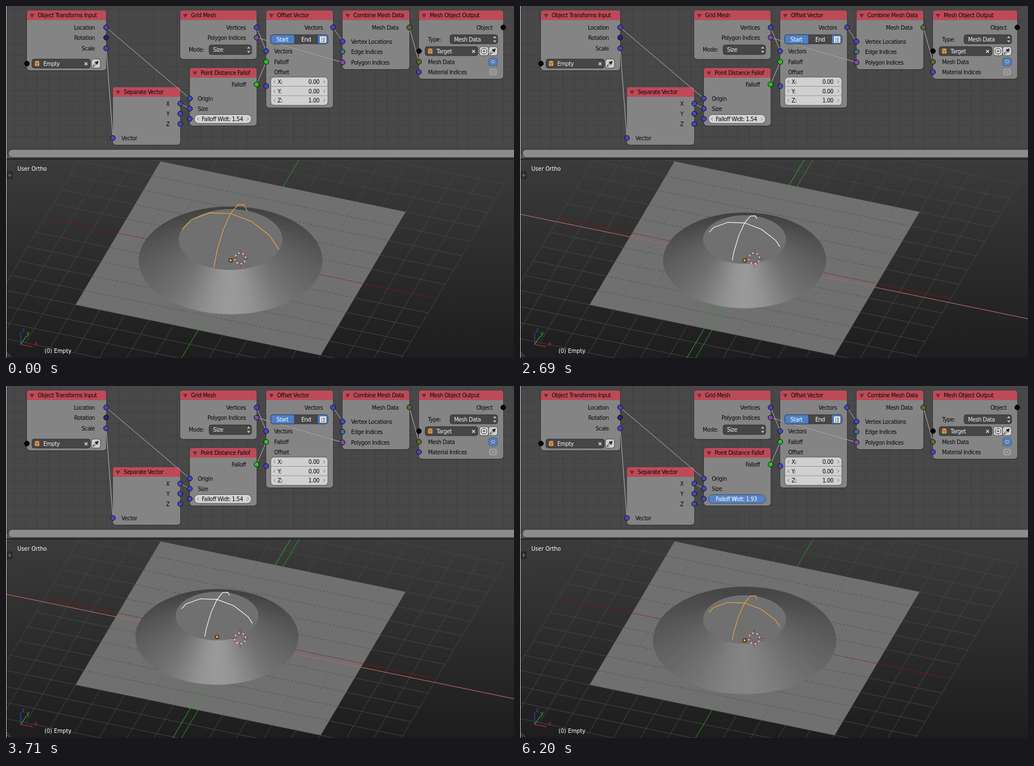
Write an HTML page with a canvas that moves like this. It is 898 by 624 pixels and loops after 6.25 s.

```html
<!DOCTYPE html>
<html lang="en">
<head>
<meta charset="utf-8">
<title>Falloff nodes</title>
<style>
html, body { margin: 0; width: 100%; height: 100%; overflow: hidden; background: #1e1e1e; }
canvas, svg { position: absolute; left: 0; top: 0; display: block; }
text { font: 9.6px "DejaVu Sans", sans-serif; letter-spacing: -.45px; white-space: pre; }
.view { letter-spacing: 0; }
</style>
</head>
<body>
<canvas id="view" width="898" height="624"></canvas>
<svg id="ui" width="898" height="624" viewBox="0 0 898 624"></svg>
<script>
// ---------- node editor ----------
const BLUE = '#4646c0', NAVY = '#29256e', GREEN = '#25c425', PURPLE = '#8448a8',
      OLIVE = '#5d6b2b', TEAL = '#41708c', BLACK = '#050505', ACTIVE = '#4f80c4';

const rect = (x, y, x2, y2, fill, rx = 0, more = '') =>
  `<rect x="${x}" y="${y}" width="${x2 - x}" height="${y2 - y}" rx="${rx}" fill="${fill}" ${more}/>`;
const label = (x, y, s, fill = '#080808', anchor = 'start', more = '') =>
  `<text x="${x}" y="${y}" fill="${fill}" text-anchor="${anchor}" ${more}>${s}</text>`;
const right = (x, y, s) => label(x, y, s, '#080808', 'end');
const path = (d, stroke, w = 1, fill = 'none', more = '') =>
  `<path d="${d}" stroke="${stroke}" stroke-width="${w}" fill="${fill}" ${more}/>`;
const socket = (x, y, c) =>
  `<circle cx="${x}" cy="${y}" r="4.4" fill="${c}" stroke="#0c0c0c" stroke-width="1"/>`;

const node = (x, y, x2, y2, title) =>
  rect(x - 1, y, x2 + 1, y2 + 1.5, '#000', 6, 'opacity=".2"') +
  rect(x, y, x2, y2, '#848484', 5) +
  path(`M${x} ${y + 17}V${y + 5}q0-5 5-5H${x2 - 5}q5 0 5 5V${y + 17}Z`, 'none', 0, '#bd4a58') +
  path(`M${x + 5} ${y + 6}h8l-4 7z`, 'none', 0, '#6c2b34') +
  label(x + 19, y + 12.2, title);

const dark = (x, y, x2, y2) => rect(x, y, x2, y2, '#464646', 4, 'stroke="#262626" stroke-width=".8"');
const light = (x, y, x2, y2) => rect(x, y, x2, y2, '#cfcfcf', 4, 'stroke="#333" stroke-width=".8"');
const menu = (x, y, x2, y2, s) => {
  const a = x2 - 5, m = (y + y2) / 2;
  return dark(x, y, x2, y2) + label(x + 7, m + 3.5, s, '#eee') +
    path(`M${a - 3} ${m - 2}l3-4l3 4zM${a - 3} ${m + 2}l3 4l3-4z`, 'none', 0, '#bbb');
};
const dropper = (x, y) => light(x - 8, y - 8, x + 8, y + 8) +
  path(`M${x - 5} ${y + 5}L${x + 1} ${y - 1}`, '#222', 2.6) +
  path(`M${x - 4} ${y + 4}L${x + 1} ${y - 1}`, '#f2f2f2', 1.2) +
  path(`M${x - 1} ${y - 3}l4 4M${x + 1} ${y - 1}l3-3`, '#222', 2.6);
const picker = (x, y, x2, s) => dark(x, y, x2, y + 16) +
  rect(x + 5, y + 3.5, x + 13, y + 12.5, '#e29a4e', 2) +
  path(`M${x + 5} ${y + 6}l4 2l4-2M${x + 9} ${y + 8}v4`, '#8a4d16', 1) +
  label(x + 20, y + 11.5, s, '#f0f0f0') +
  path(`M${x2 - 10} ${y + 6}l5 5m0-5l-5 5`, '#eee', 1.2);
const chevrons = (x, x2, y) =>
  path(`M${x + 8} ${y - 2.5}l-3 2.5l3 2.5M${x2 - 8} ${y - 2.5}l3 2.5l-3 2.5`, '#777', 1);

const links = [
  [177, 38, 325, 164], [177, 75, 189, 234], [308, 173, 325, 182], [443, 38, 460, 80],
  [443, 56, 595, 100], [443, 139, 460, 99], [578, 38, 595, 63], [713, 38, 730, 99]
];

let ui = rect(0, 0, 898, 272, '#484848');
let lines = '';
for (let x = 14; x < 898; x += 20.6) lines += `M${x.toFixed(1)} 0V254`;
for (let y = 5; y < 254; y += 20.6) lines += `M0 ${y.toFixed(1)}H898`;
ui += path(lines, '#404040');
ui += rect(0, 254, 898, 271, '#444') + rect(5, 255, 910, 268, '#8c8c8c', 6) +
  rect(0, 270.5, 898, 272, '#161616') + rect(0, 0, 1, 624, '#c8c8c8') +
  path('M0 262l8 8M0 266l4 4M0 613l9 9M0 617l5 5', '#999', .8);

ui += node(37, 8, 177, 114, 'Object Transforms Input') + node(189, 144, 308, 246, 'Separate Vector') +
  node(308, 8, 443, 94, 'Grid Mesh') + node(325, 110, 443, 212, 'Point Distance Fallof') +
  node(460, 8, 578, 180, 'Offset Vector') + node(595, 8, 713, 112, 'Combine Mesh Data') +
  node(730, 8, 879, 129, 'Mesh Object Output');
for (const [a, b, c, d] of links)
  ui += path(`M${a} ${b}L${c} ${d}`, '#333', 2, 'none', 'opacity=".3"') +
    path(`M${a} ${b}L${c} ${d}`, '#bcbcbc', 1);

ui += right(157, 42, 'Location') + right(157, 60, 'Rotation') + right(157, 79, 'Scale') +
  picker(46, 94, 149, 'Empty') + dropper(159, 102);
ui += right(289, 177, 'X') + right(289, 195, 'Y') + right(289, 213, 'Z') + label(204, 238, 'Vector');
ui += right(424, 42, 'Vertices') + right(424, 60, 'Polygon Indices') + label(323, 81, 'Mode:') +
  menu(359, 69, 434, 86, 'Size');
ui += right(424, 143, 'Falloff') + label(339, 168, 'Origin') + label(339, 186, 'Size') +
  rect(333, 192.5, 434, 208, '#d4d4d4', 7.5, 'id="field" stroke="#444" stroke-width=".8"') +
  `<g id="arrows">${chevrons(333, 434, 200.3)}</g>` +
  label(382.5, 203.8, '', '#080808', 'middle', 'id="value"') +
  `<g id="grip">${path('M376 197v7M381 197v7', '#fff', 1.2, 'none', 'stroke-dasharray="1.5 1"')}</g>`;
ui += right(560, 42, 'Vectors') + dark(468, 51, 569, 67) +
  path('M510 51H472q-4 0-4 4V63q0 4 4 4H510zM551 51h14q4 0 4 4V63q0 4-4 4H551z', '#2b3b55', .8, ACTIVE) +
  label(478, 62.5, 'Start', '#fff') + label(522, 62.5, 'End', '#fff') +
  rect(555, 54, 566, 65, '#f0f0f0', 1) + path('M557 57h2m1 0h4M557 60h2m1 0h4M557 63h2m1 0h4', '#222') +
  label(474, 84, 'Vectors') + label(474, 103, 'Falloff') + label(474, 121, 'Offset') +
  rect(468, 126, 569, 176, '#d0d0d0', 6, 'stroke="#444" stroke-width=".8"') +
  path('M468 142.5h101M468 159h101', '#888', .8);
['X:', 'Y:', 'Z:'].forEach((s, i) => {
  const y = 134.5 + 16.4 * i;
  ui += label(480, y + 3.7, s) + right(554, y + 3.7, i < 2 ? '0.00' : '1.00') + chevrons(468, 569, y);
});
ui += right(694, 42, 'Mesh Data') + label(610, 67, 'Vertex Locations') +
  label(610, 85, 'Edge Indices') + label(610, 104, 'Polygon Indices');
ui += right(860, 42, 'Object') + label(746, 63, 'Type:') + menu(785, 51, 869, 67, 'Mesh Data') +
  picker(741, 72, 834, 'Target') + dropper(861, 80) + light(837, 72, 853, 88) +
  '<circle cx="845" cy="80" r="5" fill="#eee" stroke="#222"/>' + path('M842 80h6M845 77v6', '#222') +
  label(746, 103, 'Mesh Data') + label(746, 121, 'Material Indices') +
  rect(853, 92, 869, 106, ACTIVE, 4, 'stroke="#555" stroke-width=".8"') +
  rect(858.5, 96.5, 863.5, 101, '#eee', 1) + rect(859.5, 97.5, 862.5, 100, '#335') +
  rect(853, 110, 869, 124, '#999', 4, 'stroke="#777" stroke-width=".8"') +
  '<circle cx="861" cy="117" r="2" fill="#eee" stroke="#444"/>';

ui += [
  [177, 38, BLUE], [177, 56, NAVY], [177, 75, BLUE], [37, 102, BLACK],
  [308, 173, BLUE], [308, 191, BLUE], [308, 209, BLUE], [189, 234, BLUE],
  [443, 38, BLUE], [443, 56, PURPLE], [443, 139, GREEN],
  [325, 164, BLUE], [325, 182, BLUE], [325, 200, BLUE],
  [578, 38, BLUE], [460, 80, BLUE], [460, 99, GREEN], [460, 142, BLUE],
  [713, 38, OLIVE], [595, 63, BLUE], [595, 81, TEAL], [595, 100, PURPLE],
  [879, 38, BLACK], [730, 80, BLACK], [730, 99, OLIVE], [730, 117, BLUE]
].map(s => socket(...s)).join('');

// viewport overlay
ui += label(20, 292, 'User Ortho', '#fff', 'start', 'class="view"') +
  label(68, 614.5, '(0) Empty', '#fff', 'start', 'class="view"') +
  rect(1, 293, 12, 307, '#292929', 3) + path('M3 300h7M6.500 296.500v7', '#777', 1.2) +
  path('M26 600V578', '#3d3db8', 1.3) + path('M26 600L36 585', '#2fae2f', 1.3) +
  path('M26 600L47 604', '#a82626', 1.3) +
  label(28, 578, 'z', '#4646c8') + label(36, 584, 'y', '#35c435') + label(50, 602, 'x', '#b82b2b');

const $ = id => document.getElementById(id);
$('ui').innerHTML = ui;
const field = $('field'), value = $('value'), arrows = $('arrows'), grip = $('grip');

// ---------- motion ----------
const LOOP = 6250;
const size = [[500, 2], [790, 2.47], [1110, 2.61], [1160, 2.61], [1570, 1.48], [1720, 1.48], [2140, 1.6]];
const width = [[4950, 1.54], [5250, .95], [5570, .55], [5610, .55], [5730, .95], [5880, .95], [6200, 1.93]];
const moveX = [[2690, 397], [2900, 362], [3120, 334], [3310, 395], [3360, 395], [3500, 485],
  [3600, 440], [3710, 373], [3850, 400], [3980, 440], [4070, 440], [4250, 415], [4410, 397]];
const moveY = [[2690, 451], [2900, 462], [3120, 448], [3310, 420], [3360, 420], [3500, 448],
  [3600, 480], [3710, 445], [3850, 424], [3980, 424], [4070, 424], [4250, 445], [4410, 451]];

// monotone cubic through the keys, flat at peaks and holds
function track(keys, t) {
  const n = keys.length - 1;
  if (t <= keys[0][0]) return keys[0][1];
  if (t >= keys[n][0]) return keys[n][1];
  const i = keys.findIndex(k => k[0] > t) - 1;
  const rate = j => (keys[j + 1][1] - keys[j][1]) / (keys[j + 1][0] - keys[j][0]);
  const slope = j => {
    if (j < 1 || j >= n) return 0;
    const a = rate(j - 1), b = rate(j);
    return a * b <= 0 ? 0 : 2 * a * b / (a + b);
  };
  const [t0, v0] = keys[i], [t1, v1] = keys[i + 1], h = t1 - t0, u = (t - t0) / h;
  const w = u * u * (3 - 2 * u);
  return v0 + (v1 - v0) * w + h * u * (1 - u) * (slope(i) * (1 - u) - slope(i + 1) * u);
}

// ---------- viewport ----------
const c = $('view').getContext('2d');
const UX = [43.3, 8.94], UY = [15, -25.4], UNIT = 45.8, SIN = .5876, COS = .809, UP = UNIT * COS;
const HOME = [397, 451], ORIGIN = [414.7, 447.3];
const at = (o, x, y, z = 0) => [o[0] + x * UX[0] + y * UY[0], o[1] + x * UX[1] + y * UY[1] - z * UP];

function stroke(points, color, w = 1, dash = []) {
  c.beginPath();
  points.forEach(p => c.lineTo(...p));
  c.strokeStyle = color;
  c.lineWidth = w;
  c.setLineDash(dash);
  c.stroke();
  c.setLineDash([]);
}
function fill(points, color) {
  c.beginPath();
  points.forEach(p => c.lineTo(...p));
  c.closePath();
  c.fillStyle = color;
  c.fill();
}

function floor(guides) {
  const alongX = (o, y, r, ...style) => stroke([at(o, -r, y), at(o, r, y)], ...style);
  const alongY = (o, x, r, ...style) => stroke([at(o, x, -r), at(o, x, r)], ...style);
  const g = c.createLinearGradient(0, 272, 0, 624);
  g.addColorStop(0, '#3b3b3b');
  g.addColorStop(1, '#1d1d1d');
  c.fillStyle = g;
  c.fillRect(0, 0, 898, 624);
  for (let i = -8; i <= 8; i++) if (i) {
    alongX(ORIGIN, i, 8, '#484848', .9);
    alongY(ORIGIN, i, 8, '#484848', .9);
  }
  alongX(ORIGIN, 0, 8, '#7c1616');
  alongY(ORIGIN, 0, 8, '#2b9a2b');
  if (guides) {
    alongX(HOME, 0, 14, '#d86c6c');
    alongY(HOME, 0, 14, '#2fb02f');
  }

  const plane = [[-5, 5], [5, 5], [5, -5], [-5, -5]].map(p => at(ORIGIN, ...p));
  c.save();
  fill(plane, '#707070');
  c.clip();
  for (let i = -4; i <= 4; i++) if (i) {
    alongX(ORIGIN, i, 5, '#505050', .9, [4, 3]);
    alongY(ORIGIN, i, 5, '#5b5b5b', .8, [3, 4]);
  }
  alongX(ORIGIN, 0, 5, '#861d1d', 1, [3, 1.5]);
  const axisY = o => {
    stroke([at(o, 0, 0), at(o, 0, 5.5)], '#4a7a4a', .8, [2, 9]);
    stroke([at(o, 0, 0), at(o, 0, -6)], '#2fa02f', 1, [9, 1]);
  };
  axisY(ORIGIN);
  if (guides) {
    alongX(HOME, 0, 7, '#cf6464', .9, [5, 2]);
    axisY(HOME);
  }
  c.restore();
}

function cone(o, s, w) {
  const N = 90, tilt = Math.atan(1 / w), ns = Math.sin(tilt), nz = Math.cos(tilt);
  const ring = (r, a, z) => [o[0] + r * UNIT * Math.sin(a), o[1] + r * UNIT * SIN * Math.cos(a) - z * UP];
  for (let i = N - 1; i >= 0; i--) for (const side of [-1, 1]) {
    const a = side * Math.PI * i / N, b = side * Math.PI * (i + 1) / N;
    const facing = Math.max(0, nz * SIN + ns * COS * Math.cos((a + b) / 2));
    const v = Math.min(180, 60 + 60 * facing + 115 * facing ** 16);
    const color = `rgb(${v},${v},${v})`;
    const quad = [ring(s + w, a, 0), ring(s + w, b, 0), ring(s, b, 1), ring(s, a, 1)];
    fill(quad, color);
    stroke([...quad, quad[0]], color, .4);
  }
  c.beginPath();
  c.ellipse(o[0], o[1] - UP, s * UNIT, s * UNIT * SIN, 0, 0, 7);
  c.fillStyle = '#707070';
  c.fill();
}

// two circles of a 16 sided wire sphere, only the part above the plateau
function wire(o, r, color) {
  for (const k of [[1, 0], [0, 1]]) {
    const pts = [];
    const put = (h, z) => pts.push(at(o, h * k[0], h * k[1], z));
    for (let i = 0; i < 8; i++) {
      const [p, q] = [i, i + 1].map(j => [r * Math.cos(j * Math.PI / 8), r * Math.sin(j * Math.PI / 8)]);
      const u = (1 - p[1]) / (q[1] - p[1]), cut = p[0] + (q[0] - p[0]) * u;
      if (p[1] >= 1) put(...p);
      if ((p[1] - 1) * (q[1] - 1) < 0) put(cut, 1);
    }
    stroke(pts, color, 1.1);
  }
}

function scaleCursor(s) {
  const d = 143.3 * s, p = [HOME[0] + .955 * d, HOME[1] - .297 * d];
  stroke([HOME, p], 'rgba(165,165,165,.6)', .9, [3, 3]);
  c.save();
  c.translate(...p);
  c.rotate(Math.atan2(-.297, .955));
  for (const k of [-1, 1]) {
    stroke([[3 * k, 0], [9 * k, 0]], '#949494', 2.2);
    fill([[8 * k, -4.5], [15 * k, 0], [8 * k, 4.5]], '#949494');
  }
  c.restore();
}

function cursor3d() {
  const [x, y] = [414, 447.5];
  for (const [dx, dy] of [[1, 0], [-1, 0], [0, 1], [0, -1]])
    stroke([[x + 6 * dx, y + 6 * dy], [x + 16 * dx, y + 16 * dy]], 'rgba(30,30,30,.55)', .8);
  for (let i = 0; i < 16; i++) {
    c.beginPath();
    c.arc(x, y, 9.6, i * Math.PI / 8, (i + 1) * Math.PI / 8);
    c.strokeStyle = i % 2 ? '#f4f4f4' : '#e01c1c';
    c.lineWidth = 1.2;
    c.stroke();
  }
}

function draw(t) {
  const scaling = t >= 500 && t < 2140, moving = t >= 2690 && t < 4410;
  const white = (t >= 500 && t < 2350) || moving, dragging = t >= 4950;
  const s = track(size, t), w = track(width, t);
  const o = moving ? [track(moveX, t), track(moveY, t)] : HOME;

  floor(moving);
  cone(o, s, w);
  wire(o, 1.12 * s, white ? '#fff' : '#f5a53c');
  if (scaling) scaleCursor(s);
  cursor3d();
  c.beginPath();
  c.arc(o[0], o[1], 3, 0, 7);
  c.fillStyle = '#f0a02c';
  c.fill();
  c.strokeStyle = '#111';
  c.lineWidth = 1.1;
  c.stroke();

  field.setAttribute('fill', dragging ? '#5583c8' : t >= 4750 ? '#e8e8e8' : '#d4d4d4');
  value.setAttribute('fill', dragging ? '#fff' : '#080808');
  value.textContent = 'Falloff Widt: ' + w.toFixed(2);
  arrows.style.display = dragging ? 'none' : '';
  grip.style.display = dragging ? '' : 'none';
}

function tick() {
  draw(performance.now() % LOOP);
  requestAnimationFrame(tick);
}
tick();
</script>
</body>
</html>
```
